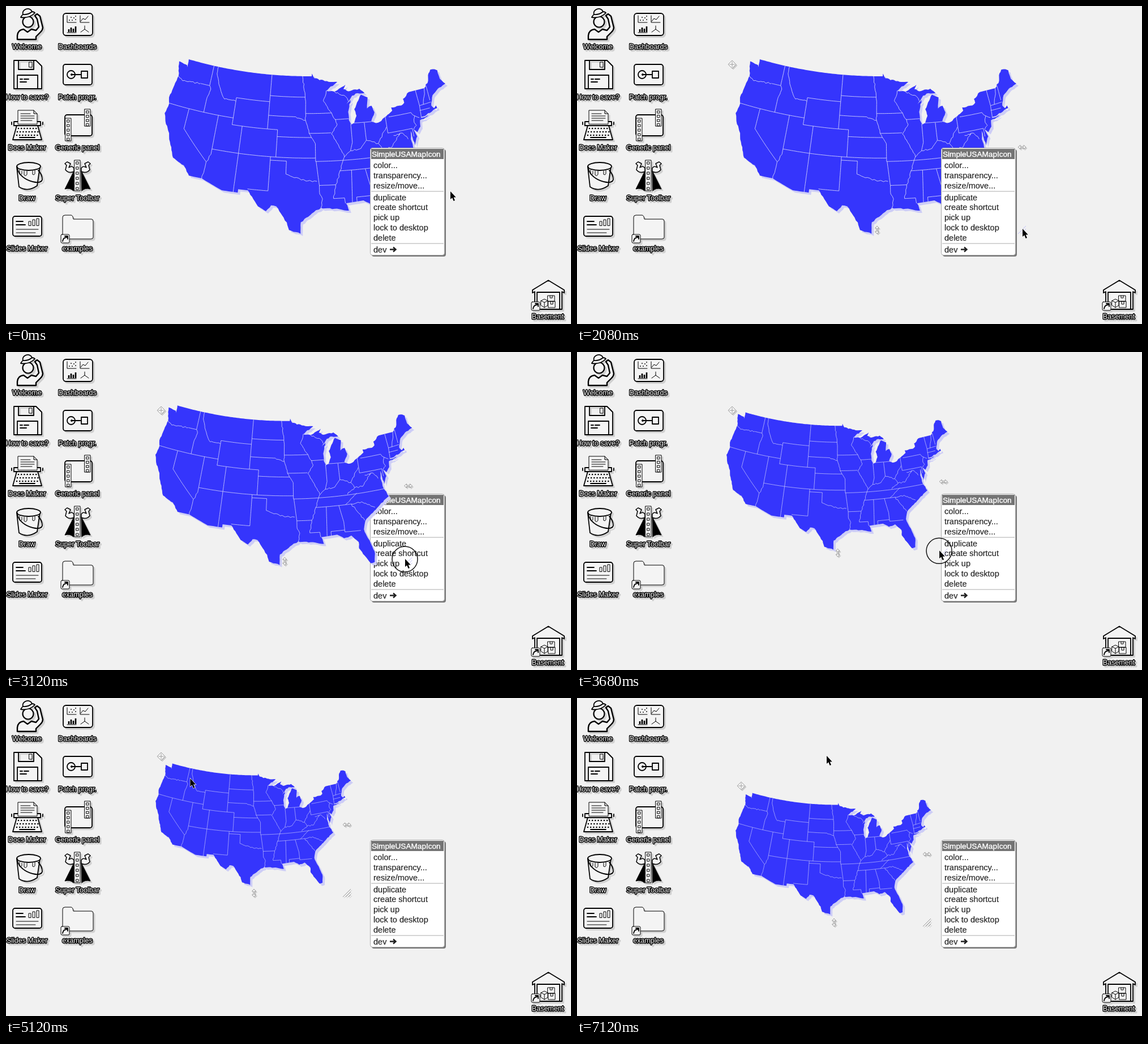
These frames come from a looping animation (998 by 561 pixels, 7200 ms). An HTML page:

```html
<!DOCTYPE html>
<html lang="en">
<head>
<meta charset="utf-8">
<title>Desktop map resize</title>
<style>
html, body { margin: 0; width: 100%; height: 100%; overflow: hidden; background: #f1f1f1; }
svg { display: block; font-family: "Liberation Sans", Arial, sans-serif; }
.icon { fill: #f4f4f4; stroke: #000; stroke-width: 1.8; stroke-linejoin: round; stroke-linecap: round; filter: drop-shadow(3px 3px 0 #d0d0d0); }
.icon .thin { stroke-width: 1; }
.icon .open { fill: none; }
.icon .solid { fill: #000; stroke-width: 1; }
.icon text { font-size: 12.5px; text-anchor: middle; fill: #fff; stroke: #000; stroke-width: 2.8px; paint-order: stroke; }
#menu text { font-size: 14.5px; fill: #262626; stroke: #262626; stroke-width: .2px; }
#menu .title { font-size: 13.6px; fill: #fff; stroke: #fff; stroke-width: .4px; }
#map { filter: drop-shadow(4px 4px 0 #cdcdf6); }
#land { fill: #3535fc; }
#borders { fill: none; stroke: #cfcffb; stroke-width: .9; stroke-linejoin: round; }
#handles path { fill: #fafafa; stroke: #999; filter: drop-shadow(2px 2px 0 #ccc); }
#handles .hot { stroke: #bdbdf8; filter: none; }
</style>
</head>
<body>
<svg id="stage" width="998" height="561" viewBox="0 0 998 561">
  <g class="icon">
    <path stroke-width="2.4" d="M20 59V52Q21 42 31 41L38 46 45 41 53 43 58 37 55 23 51 17 55 14 60 18 65 38Q65 42 61 46L53 54V59Z"/>
    <circle cx="39" cy="28" r="9.500" stroke-width="2.2"/>
    <path d="M26 20Q28 16 30 15C27 5 43 1 46 10Q49 10 51 12Q42 22 26 20ZM30 15Q39 16 46 10"/>
    <text x="37" y="76">Welcome</text>
  </g>
  <g class="icon">
    <rect x="101" y="13" width="52" height="39" rx="5"/>
    <path class="thin open" d="M108 17V29H124M131 17V29H147M132 27L136 22 140 24 145 18M108 47H124M139 35V41L132 46M139 41L146 46"/>
    <path class="open" stroke-width="2.6" stroke-linecap="butt" d="M111 46V41M115 46V38M119 46V40M123 46V36"/>
    <path class="open" d="M112 25h0M115 20h0M117 25h0M120 21h0M123 24h0M123 18h0"/>
    <text x="126" y="76">Dashboards</text>
  </g>
  <g class="icon">
    <path d="M14 96H53L63 106V146H14ZM22 96V112H49V96M20 146V122H56V146"/>
    <path class="thin" d="M41 99H46V108H41Z"/>
    <path class="open" d="M25 129H29M32 129H40M25 134H36"/>
    <text x="37" y="165">How to save?</text>
  </g>
  <g class="icon">
    <rect x="101" y="103" width="51" height="36" rx="4"/>
    <path class="open" d="M116 121H133M133 115H144V127H133Z"/>
    <circle class="open" cx="115" cy="121" r="7"/><circle class="solid" cx="116" cy="121" r="1.500"/>
    <text x="126" y="165">Patch progr.</text>
  </g>
  <g class="icon">
    <path d="M14 204H61V211H14ZM19 211H56L63 236H12Z"/>
    <path class="thin" d="M21 208V184H49L55 190V208ZM49 184V190H55"/>
    <path class="thin open" d="M26 190H43M26 194H50M26 198H50M26 202H46"/>
    <path class="open" stroke-width="2.6" stroke-dasharray="0 5.2" d="M22 216H56M20 222H58M19 228H59"/>
    <path class="open" d="M24 232H51M10 205V209M65 205V209"/>
    <text x="37" y="254">Docs Maker</text>
  </g>
  <g class="icon">
    <rect x="104" y="192" width="48" height="37" rx="4"/>
    <g id="strips" class="thin"></g>
    <text x="126" y="254">Generic panel</text>
  </g>
  <g class="icon">
    <path d="M19 284L23 319Q38 329 55 317L60 283"/>
    <ellipse cx="40" cy="283" rx="21" ry="7"/>
    <path class="open" d="M20 284C20 306 62 319 64 306Q64 297 57 290"/>
    <path class="thin open" d="M24 289V297Q26 299 28 296V291M32 291V298Q35 301 37 297V291M47 291V297Q50 299 51 296V290"/>
    <text x="37" y="343">Draw</text>
  </g>
  <g class="icon">
    <path class="solid" d="M120 291L104 323Q113 320 119 326ZM133 291L149 323Q140 320 134 326Z"/>
    <path stroke-width="1.5" d="M120 292Q111 296 105 289L107 281 104 278 108 275 114 278 111 285Q117 281 120 286ZM133 292Q142 296 148 289L146 281 149 278 145 275 139 278 142 285Q136 281 133 286Z"/>
    <g id="tower" class="thin"></g>
    <text x="126" y="343">Super Toolbar</text>
  </g>
  <g class="icon">
    <rect x="12" y="371" width="51" height="35" rx="4"/>
    <path class="open" d="M18 380H30M18 386H34"/>
    <path class="thin open" d="M18 394H57M18 400H52M40 387V380H44V387ZM47 387V377H51V387ZM54 387V375H58V387Z"/>
    <text x="37" y="432">Slides Maker</text>
  </g>
  <g class="icon">
    <path class="thin" d="M100 408V373Q100 369 104 369H115Q118 369 119 376H151Q154 376 154 380V408Q154 411 150 411H104Q100 411 100 408Z"/>
    <g id="link"><rect class="thin" x="97" y="403" width="15" height="15" rx="2"/><path class="open" d="M100 415Q101 408 108 408M104 406H109V411"/></g>
    <text x="126" y="432">examples</text>
  </g>
  <g class="icon">
    <path d="M930 501L958 484 986 501V506L982 504V535H934V504L930 506Z"/>
    <path class="open" d="M938 535V505H978V535"/>
    <path class="thin" d="M957 511H969V521H957ZM961 511V515H965V511M958 521H970V532H958ZM962 521V526H966V521M945 520L951 517 957 520V528L951 532 945 528ZM945 520L951 523 957 520M951 523V532"/>
    <use href="#link" x="831" y="119"/>
    <text x="957" y="552">Basement</text>
  </g>

  <g id="map"><g id="scaled"><path id="land"/><path id="borders"/></g></g>

  <g id="menu">
    <rect x="646" y="253" width="131" height="189" rx="4" fill="#777"/>
    <rect x="643.5" y="250.5" width="131" height="189" rx="4" fill="#fff" stroke="#aaa"/>
    <rect x="645" y="252" width="128" height="18" fill="#747474"/>
    <text class="title" x="646" y="266">SimpleUSAMapIcon</text>
    <rect id="hover" x="645" width="128" height="17.5" fill="#b6b6b6"/>
    <path d="M645 327H773M645 419H773" stroke="#d5d5d5" stroke-width="2"/>
    <g id="rows"></g>
    <path d="M678 429.500H688M684 425.500L688.500 429.500 684 433.500" fill="none" stroke="#222" stroke-width="2.4"/>
  </g>

  <g id="handles">
    <path d="M0-7L7 0 0 7-7 0ZM-5 0H5M0-5V5"/>
    <path d="M-7 0L-3-3.500V-1H3V-3.500L7 0 3 3.500V1H-3V3.500Z"/>
    <path d="M0-7L-3.500-3H-1V3H-3.500L0 7 3.500 3H1V-3H3.500Z"/>
    <path d="M-7 7L7-7M-2 7L7-2M3 7L7 3"/>
  </g>
  <circle id="press" r="22.5" fill="none" stroke="#111" stroke-width="1.5"/>
  <path id="cursor" d="M0 0V14L3.200 11.200 5.600 17 8 16 5.600 10.500H9.800Z" stroke="#fff" stroke-width="1.2" paint-order="stroke"/>
</svg>
<script>
const $ = id => document.getElementById(id);

let seed = 7;
const random = () => (seed = seed * 16807 % 2147483647) / 2147483647;

// Albers conic projection of degrees west and north
function project(west, north) {
  const rad = Math.PI / 180, n = .6029;
  const angle = n * (96 - west) * rad;
  const radius = 687 / n * Math.sqrt(1.3513 - 2 * n * Math.sin(north * rad));
  return [533 + radius * Math.sin(angle), radius * Math.cos(angle) - 633].map(v => v.toFixed(1)).join(" ");
}

// Subdivides a line of "west north" points, with an optional wobble
function trace(line, wobble = 0) {
  const points = line.split(",").map(p => p.trim().split(" ").map(Number));
  const out = [];
  points.forEach(([x, y], i) => {
    const [nx, ny] = points[i + 1] || [x, y];
    const steps = Math.max(1, Math.round(Math.hypot(nx - x, ny - y) / .4));
    for (let s = 0; s < steps; s++) {
      const jitter = () => s && (random() - .5) * wobble;
      out.push(project(x + (nx - x) * s / steps + jitter(), y + (ny - y) * s / steps + jitter()));
    }
  });
  return out.join("L");
}

const shores = [
  "95.2 49,95.1 49.4,94.6 48.7,91.5 48.1,89.6 48,92.1 46.8,90.4 46.6,87.9 47.5,88.4 46.9,87.4 46.5,85 46.7,84 46,85.5 46.1,86.7 45.8,88 44.6,87.1 45.2,87.8 43.5,87.8 42.3",
  "87.4 41.6,86.8 41.8,86.2 42.8,86.5 43.8,85.5 45,84.8 45.8,83.5 45.3,83.9 43.7,82.9 44,82.5 43,83.4 41.7,82.5 41.4,81.7 41.5,78.9 42.8,79 43.3,76.9 43.3,76.2 43.6,76.3 44.2,74.8 45",
  "71.5 45,70.3 45.9,70 46.7,69.2 47.4,68.3 47.3,67.8 47,67.8 45.7,67 44.8,68.8 44.4,70.2 43.7,71 42.3,70.6 41.8,70.1 42.1,70 41.7,73.7 40.9,72 41,73.9 40.6,74.1 39.7,74.9 39,75.5 39.5",
  "75.1 38.4,75.9 37.2,76.1 39.4,76.4 38.2,76.3 37,75.5 35.2,76.6 34.7,77.9 33.9,79.2 33.1,80.9 32,81.4 30.7,80.1 26.9,80.4 25.2,81.1 25.1,82.8 27.8,82.7 28.8,83.9 30,85.3 29.7,86.5 30.4",
  "89.5 30.2,89.1 29.1,91.5 29.5,93.8 29.7,95 29.1,97.2 27.6,97.2 25.9,99.1 26.4,99.5 27.5,101.4 29.8,102.3 29.9,103.1 29,104.5 29.6,106.5 31.8"
];
const pacific = "117.1 32.5,118.4 33.8,120.6 34.5,121.9 36.6,122.5 37.8,123.8 39.3,124.4 40.4,124.1 41.9,124.5 42.8,123.9 46.2,124.7 48.3,122.8 48.1,122.4 47.3,122.8 49";
const south = "106.5 31.8,108.2 31.8,108.2 31.3,111 31.3,114.8 32.5,117.1 32.5";

// State lines that follow parallels and meridians
const straight = {
  west: "124.2 42,111 42;117 49,117 46,118.9 46;117 44,117 42;120 42,120 39,114.6 35;114 42,114 36.2;111 41,111 45,104 45;111 41,102 41,102 37;104 49,104 41;109 41,109 31.3;114 37,94.6 37;103 37,103 32,106.6 32",
  middle: "104 45.9,96.6 45.9;104 43,98.5 43;102 40,95.3 40;103 36.5,100 36.5,100 34.6;96.5 45.3,96.5 43.5,91.2 43.5;95.8 40.6,91.5 40.6;94.6 39.1,94.6 36.5,75.9 36.5;94.5 36.5,94 33,94 32;94 33,91.1 33;91.6 31,89.7 31,89.6 30.2;90.2 35,83.1 35",
  east: "88.1 35,88.4 30.3;85.6 35,85 32.3,85 30.7,82 30.6;87.6 30.3,87.6 31,85 31;90.6 42.5,87.8 42.5;87.5 41.7,87.5 39,88 37.8;87 41.8,83.4 41.7;84.8 41.7,84.8 39.1;80.5 42.2,80.5 39.7,75.7 39.7,75.7 38.5;79.8 42,75.3 42;73.4 45,73.3 42.7,73.5 41;73.3 42.7,70.9 42.8;73.5 42,71.4 42;71 45.3,71 43.1"
};
const rivers = {
  west: "116 49,116 48,114.4 45.5,113.4 44.5,111 44.5;117 46,116.6 45.5,117 44;123.9 46.2,122.8 45.7,119 46;114 36.2,114.6 35,114.8 32.5",
  plains: "98.5 43,96.5 42.5,95.8 40.6,94.6 39.1;97.2 49,96.5 45.3;100 34.6,97.2 33.8,94.4 33.6;94 32,93.5 31,93.8 29.7;96.5 43.5,96.5 42.5",
  middle: "92.1 46.8,92.8 45.3,91.2 43.5,90.2 41.8,91.4 40.4,90.2 38.8,89.2 37,90.2 35,91.1 33,91.6 31;89.2 37,88 37.8,86 38,84.8 39.1,82.6 38.4,80.6 40.6;90.4 46.6,88.1 45.8,87.6 45.1",
  east: "82.6 38.4,82 37.5,83.6 36.6;82 37.5,80.3 37.5,78.3 39.4;79.5 39.2,77.7 39.3,76.9 38.3;84.3 35,81.7 36.6;83.1 35,81 35.1,78.6 33.9;83.1 35,81 32.1;75.3 42,74.7 41.4,75.1 40.5,74.8 40,75.5 39.5;74.7 41.4,73.9 41;71.5 45,72.5 42.7"
};
const lines = (groups, wobble) => Object.values(groups).join(";").split(";").map(l => "M" + trace(l, wobble)).join("");
$("land").setAttribute("d", "M" + [trace("122.8 49,95.2 49"), ...shores.map(s => trace(s, .16)), trace(south), trace(pacific, .16)].join("L") + "Z");
$("borders").setAttribute("d", lines(straight, 0) + lines(rivers, .25));

const strip = (x, y, cells, step) => `<rect x="${x}" y="${y}" width="10" height="${cells * step}"/>` +
  Array.from({length: cells}, (_, i) => `<rect x="${x + 3}" y="${y + 3 + i * step}" width="4" height="4"/>`).join("");
$("strips").innerHTML = strip(105, 198, 5, 8) + strip(139, 182, 4, 7.5);
$("tower").innerHTML = strip(121, 272, 6, 9);

const groups = [[281, "color...", "transparency...", "resize/move..."],
  [337.5, "duplicate", "create shortcut", "pick up", "lock to desktop", "delete"], [429.5, "dev"]];
const rows = groups.flatMap(([y, ...labels]) => labels.map((label, i) => [label, y + 17.9 * i]));
$("rows").innerHTML = rows.map(([label, y]) => `<text x="649" y="${y + 5}">${label}</text>`).join("");

// Pointer stops: time, x, y
const stops = [[0, 785, 327], [160, 785, 327], [800, 749, 315], [1280, 749, 315], [1840, 787, 393], [2240, 787, 393],
  [3120, 705, 365], [4000, 603, 342], [4400, 603, 342], [5360, 274, 105], [5760, 274, 105],
  [6080, 275, 133], [6480, 290, 157], [6640, 290, 157], [7120, 441, 102], [7200, 441, 102]];
const resize = [2240, 4000], move = [5760, 6480], lag = 70;
const presses = [[720, 880], [2160, 4320], [5680, 6600]];
const within = (t, [a, b]) => t >= a && t < b;
const clamp = (t, [a, b]) => Math.min(b, Math.max(a, t));

function pointer(t) {
  const i = stops.findIndex(s => s[0] > t);
  const [t0, x0, y0] = stops[i - 1], [t1, x1, y1] = stops[i];
  let k = (t - t0) / (t1 - t0);
  if (!within(t, resize) && !within(t, move)) k = k * k * (3 - 2 * k);
  return [x0 + (x1 - x0) * k, y0 + (y1 - y0) * k];
}
const place = (el, x, y) => el.setAttribute("transform", `translate(${x} ${y})`);
const show = (el, on) => el.style.display = on ? "" : "none";

function draw(now) {
  const t = Math.floor(now % 7200 / 80) * 80;
  const [px, py] = pointer(t);
  const [cx, cy] = pointer(clamp(t - lag, resize));
  const [left, my] = pointer(clamp(t - lag, move));
  const top = my - 2, w = cx - 275, h = cy - 101;
  const midX = left + w / 2, midY = top + h / 2;

  // The map fits inside the frame, which reaches 9px past its handles
  const scale = Math.min((w + 18) / 497, (h + 18) / 310);
  $("scaled").setAttribute("transform", `translate(${midX} ${midY}) scale(${scale}) translate(-529.5 -249)`);
  const raised = t >= resize[0];
  $("stage").insertBefore($("map"), raised ? $("handles") : $("menu"));

  const spots = [[left, top], [left + w, midY], [midX, top + h], [left + w, top + h]];
  show($("handles"), t >= 800);
  spots.forEach(([x, y], i) => {
    const handle = $("handles").children[i];
    place(handle, x, y);
    handle.classList.toggle("hot", Math.hypot(x - px, y - py) < 13);
  });

  const row = rows.find(r => Math.abs(r[1] - py) < 9);
  const over = row && px > 645 && px < 773 && !raised;
  show($("hover"), over);
  if (over) $("hover").setAttribute("y", row[1] - 9);

  show($("press"), presses.some(p => within(t, p)));
  place($("press"), px - .5, py + .5);
  place($("cursor"), px, py);
  requestAnimationFrame(draw);
}
requestAnimationFrame(draw);
</script>
</body>
</html>
```
